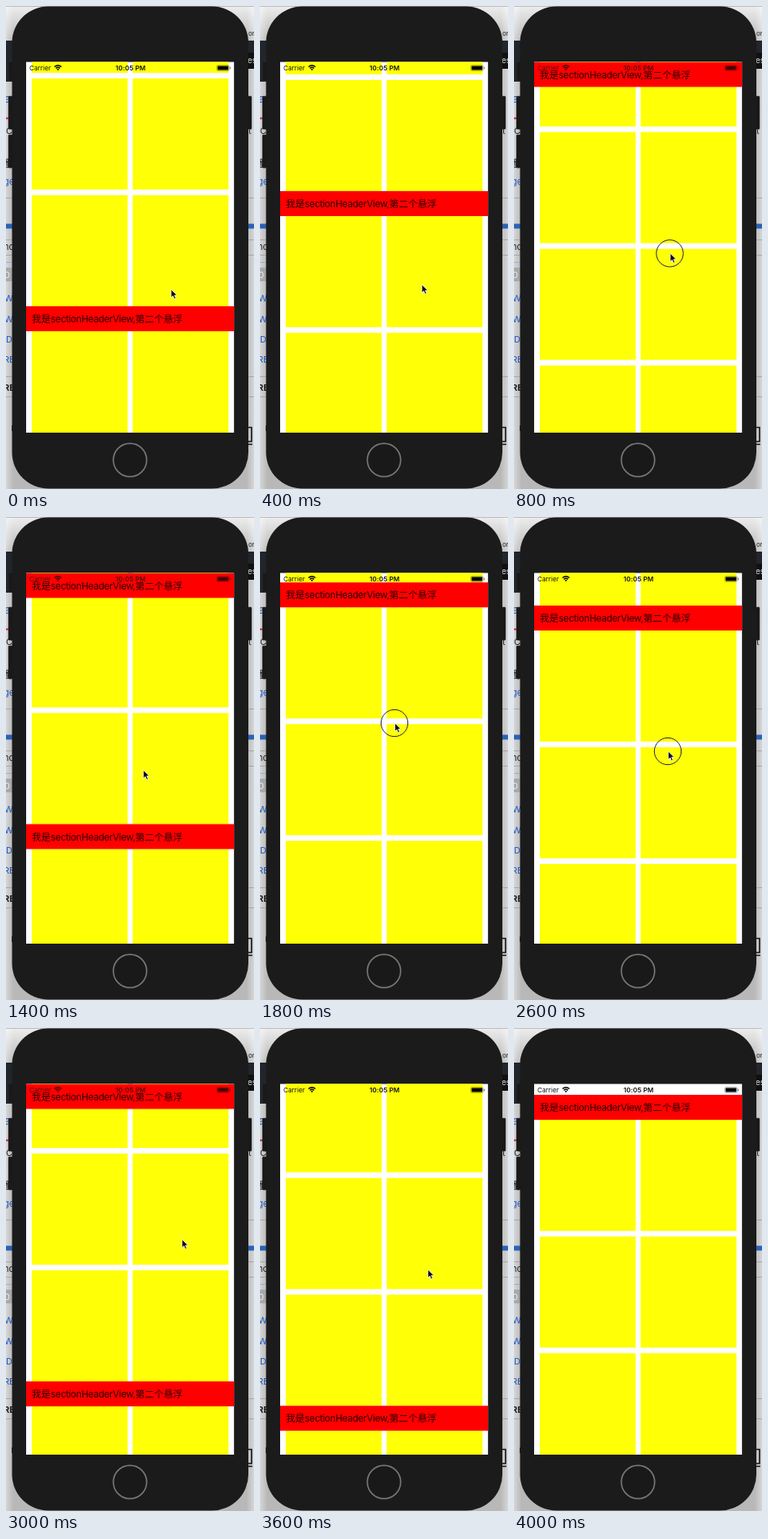
These frames come from a looping animation (308 by 600 pixels, 4100 ms). An HTML page:

```html
<!DOCTYPE html>
<html lang="zh">
<head>
<meta charset="utf-8">
<style>
html, body { margin: 0; width: 100%; height: 100%; overflow: hidden; background: #ccc; }
svg { display: block; width: 308px; height: 600px; }
text { font-family: Inter, "Noto Sans CJK SC", "Noto Sans CJK", sans-serif; }
.title { font-size: 11.75px; fill: #2a0000; }
.latin { letter-spacing: -.33px; }
.status { font-size: 8.2px; fill: #111; }
.page { font-size: 11px; fill: #222; }
.page .link { fill: #1f58c0; }
</style>
</head>
<body>
<svg viewBox="0 0 308 600" xmlns="http://www.w3.org/2000/svg">
  <defs>
    <linearGradient id="shade">
      <stop offset="0" stop-color="#d6d6d6"/><stop offset=".03" stop-color="#b8b8b8"/>
      <stop offset=".97" stop-color="#b8b8b8"/><stop offset="1" stop-color="#d6d6d6"/>
    </linearGradient>
    <linearGradient id="glow" x2="0" y2="1">
      <stop offset="0" stop-color="#fff" stop-opacity=".75"/><stop offset="1" stop-color="#fff" stop-opacity="0"/>
    </linearGradient>
    <clipPath id="screen"><rect x="25" y="69.500" width="258.400" height="460.500"/></clipPath>
  </defs>

  <g class="page">
    <rect width="308" height="600" fill="url(#shade)"/>
    <rect width="308" height="43" fill="url(#glow)"/>
    <path d="M0 .5H308" stroke="#bbb"/>
    <path d="M0 238.500H308M0 290.500H308M0 309.500H308M0 460.500H308M0 485.500H308" stroke="#a5a5a5"/>
    <path d="M0 43H10V94H0ZM298 43H308V58H298Z" fill="#20262c"/>
    <path d="M299 58H308V78H299Z" fill="#111"/>
    <path d="M0 270.500H308V276.500H0Z" fill="#2a62b8"/>
    <path d="M0 139.500H5" stroke="#c22" stroke-width="2"/>
    <path d="M0 318.500H8" stroke="#8eb2d8"/>
    <rect y="325" width="8" height="17" fill="#a8a8a8"/>
    <text x="-2" y="120" class="link" font-size="14">a</text>
    <text x="0" y="159">C</text>
    <text x="-6" y="200" font-size="13">播</text>
    <text x="-3" y="222" class="link">ge</text>
    <text x="-3" y="303">nc</text>
    <text x="-2" y="338" fill="#eee">0</text>
    <text x="-2" y="367" class="link">W</text>
    <text x="-2" y="393" class="link">W</text>
    <text x="0" y="418" class="link">D</text>
    <text x="-3" y="443" class="link">RE</text>
    <text x="-3" y="478" font-weight="700">RE</text>
    <text x="301" y="37" font-size="8">or</text>
    <text x="300" y="71" font-size="10" style="fill:#ddd">es</text>
    <text x="301" y="159">t</text>
    <path d="M8 521V528M300 523.500H305V541H300M300 544.500H306" fill="none" stroke="#111" stroke-width="1.600"/>
  </g>

  <g fill="#191919">
    <path d="M3 70Q3 69 4 69H10V93H4Q3 93 3 92ZM3 113Q3 112 4 112H10V153H4Q3 153 3 152ZM3 161Q3 160 4 160H10V201H4Q3 201 3 200ZM298 112H304Q305 112 305 113V152Q305 153 304 153H298Z" stroke="#333" stroke-width=".5"/>
    <rect x="7.500" y=".5" width="293.500" height="599" rx="45" fill="#1b1b1b"/>
    <circle cx="154" cy="564" r="20.700" stroke="#777" stroke-width="1.700"/>
  </g>

  <g clip-path="url(#screen)">
    <rect x="25" y="69" width="258.400" height="461" fill="#fff"/>
    <g id="cells" fill="#ffff05"></g>
    <g id="heads"></g>
    <g id="status">
      <text class="status" x="29" y="80">Carrier</text>
      <text class="status" x="154.700" y="80" text-anchor="middle" font-weight="600" letter-spacing=".1">10:05 PM</text>
      <g fill="none" stroke="#000" stroke-width="1.500">
        <path d="M60.200 75.500Q64.500 71.900 68.800 75.500M61.900 77.400Q64.500 75.300 67.100 77.400"/>
        <path d="M64.500 80.200L63 78.500Q64.500 77.400 66 78.500Z" fill="#000" stroke="none"/>
        <rect x="261.700" y="73.500" width="15.600" height="7" rx="1.600" stroke-width=".6" stroke-opacity=".45"/>
        <rect x="262.700" y="74.500" width="13.600" height="5" rx=".8" fill="#000" stroke="none"/>
        <path d="M278.500 75.700V78.300" stroke-width="1" stroke-opacity=".5"/>
      </g>
    </g>
  </g>

  <g id="cursor">
    <circle id="press" cx="-.5" r="16.700" fill="none" stroke="#1c1c44" stroke-width="1"/>
    <path d="M0 0V10.300L2.400 8.100L4 11.900L5.900 11.100L4.300 7.400H7.500Z" fill="#0b0b14" stroke="#fff" stroke-width=".8"/>
  </g>
</svg>

<script>
const LOOP = 4100, STEP = 100;
const TOP = 69.5, START = 83, HEAD = 31, CELL = 138, PITCH = 145;
const ROWS = 5, SECTIONS = 3;
const SECTION = HEAD + ROWS * PITCH - 7;

// [time, scroll offset]
const scrollKeys = [[0, 459], [800, 851.4], [1400, 1199.5], [2200, 302],
  [3000, 1142], [3600, 362.7], [4000, 0]];
// [time, x, y]
const cursorKeys = [[0, 205, 352], [400, 201, 346], [700, 196, 328], [800, 194, 307.3],
  [900, 192, 288], [1200, 176, 302], [1400, 170.6, 314.4], [1700, 168, 232],
  [1900, 167, 280], [2200, 165.6, 233], [2500, 185, 312], [2700, 198, 270],
  [3000, 218.6, 262.6], [3200, 214, 252], [3400, 210, 296], [3600, 208.5, 300], [4000, 208.5, 300]];
const presses = [[700, 900], [1700, 1900], [2500, 2700], [3200, 3400]];

const $ = id => document.getElementById(id);
const add = (parent, tag, attrs) => {
  const el = document.createElementNS("http://www.w3.org/2000/svg", tag);
  for (const k in attrs) el.setAttribute(k, attrs[k]);
  return parent.appendChild(el);
};
const moveTo = (el, x, y) => el.setAttribute("transform", `translate(${x} ${y})`);

const heads = [];
for (let s = 0; s < SECTIONS; s++) {
  for (let r = 0; r < ROWS; r++)
    for (const x of [32, 157.3])
      add($("cells"), "rect", { x, y: s * SECTION + HEAD + r * PITCH, width: 119, height: CELL });
  const head = add($("heads"), "g", {});
  add(head, "rect", { x: 25, width: 258.4, height: HEAD, fill: "#f00" });
  add(head, "text", { x: 32, y: 20, class: "title" }).innerHTML =
    '我是<tspan class="latin">sectionHeaderView,</tspan>第二个悬浮';
  heads.push(head);
}

function segment(keys, t) {
  let i = 0;
  while (i < keys.length - 2 && t >= keys[i + 1][0]) i++;
  const span = keys[i + 1][0] - keys[i][0];
  return { i, span, u: Math.min(1, (t - keys[i][0]) / span) };
}

const rate = i => (scrollKeys[i + 1][1] - scrollKeys[i][1]) / (scrollKeys[i + 1][0] - scrollKeys[i][0]);

// Zero speed at turning points, harmonic mean elsewhere
function slope(i) {
  if (i === 0 || i === scrollKeys.length - 1) return 0;
  const a = rate(i - 1), b = rate(i);
  return a * b <= 0 ? 0 : 2 * a * b / (a + b);
}

function scrollAt(t) {
  const { i, span, u } = segment(scrollKeys, t);
  const p = scrollKeys[i][1], q = scrollKeys[i + 1][1], v = 1 - u;
  return p * (1 + 2 * u) * v * v + q * u * u * (3 - 2 * u)
    + span * u * v * (slope(i) * v - slope(i + 1) * u);
}

function cursorAt(t) {
  const { i, u } = segment(cursorKeys, t);
  const a = cursorKeys[i], b = cursorKeys[i + 1];
  return [a[1] + (b[1] - a[1]) * u, a[2] + (b[2] - a[2]) * u];
}

function draw(t) {
  const base = START - scrollAt(t);
  moveTo($("cells"), 0, base);
  let covered = false;
  heads.forEach((head, s) => {
    let y = base + s * SECTION;
    // Every header but the first sticks until the next pushes it out
    if (s > 0) y = Math.min(Math.max(y, TOP), base + (s + 1) * SECTION - HEAD);
    if (y < START - 4 && y + HEAD > START) covered = true;
    moveTo(head, 0, y);
  });
  $("status").setAttribute("opacity", covered ? .7 : 1);
  moveTo($("cursor"), ...cursorAt(t));
  $("cursor").style.display = t < 4000 ? "" : "none";
  $("press").style.display = presses.some(([a, b]) => t >= a && t <= b) ? "" : "none";
}

const begin = performance.now();
function tick() {
  const t = (performance.now() - begin) % LOOP;
  draw(Math.floor(t / STEP) * STEP);
  requestAnimationFrame(tick);
}
tick();
</script>
</body>
</html>
```
